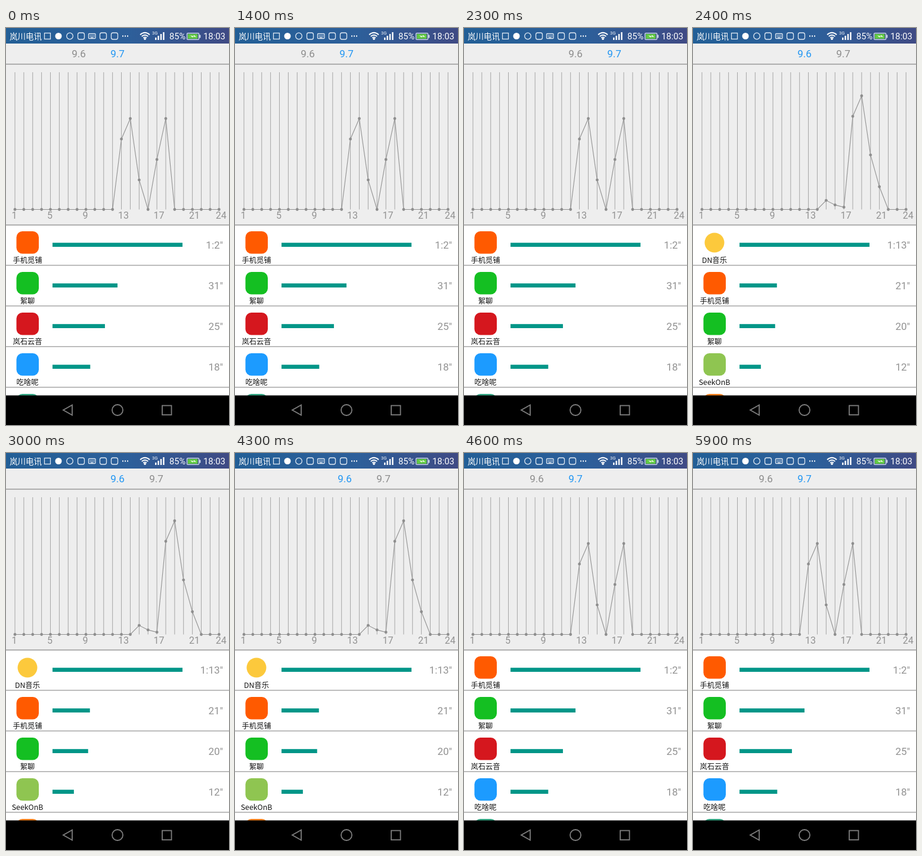
Animation of 374x664 px, one loop 6.4 s. Source, as an HTML page:

```html
<!DOCTYPE html>
<html lang="zh-CN">
<head>
<meta charset="utf-8">
<title>App usage</title>
<style>
  html, body { margin: 0; width: 100%; height: 100%; overflow: hidden; background: #fff; }
  svg { display: block; width: 374px; height: 664px; font-family: Roboto, "Noto Sans CJK SC", sans-serif; }
  .label { font: 12.3px "Noto Sans CJK SC", "Noto Sans CJK", sans-serif; fill: #111; text-anchor: middle; }
  .duration { font-size: 17px; fill: #929292; text-anchor: end; }
  .hour { font-size: 16px; fill: #929292; }
  .tab { font-size: 17px; text-anchor: middle; }
  .rule { stroke: #969696; stroke-width: 1.3; }
</style>
</head>
<body>
<svg viewBox="0 0 374 664">
  <defs>
    <linearGradient id="sky">
      <stop offset="0" stop-color="#235f96"/>
      <stop offset=".55" stop-color="#2d5f9a"/>
      <stop offset="1" stop-color="#3f4a84"/>
    </linearGradient>
  </defs>
  <rect y="26" width="374" height="303" fill="#eee"/>
  <path class="rule" d="M0 60.5H374M0 329.5H374"/>
  <g id="tabs">
    <text class="tab" x="122" y="49.3">9.6</text>
    <text class="tab" x="187" y="49.3">9.7</text>
  </g>
  <g id="grid"></g>
  <g id="pages"></g>

  <rect width="374" height="26" fill="url(#sky)"/>
  <g fill="#fff">
    <text x="6" y="18.7" style="font:500 13.5px 'Noto Sans CJK SC','Noto Sans CJK',sans-serif">岚川电讯</text>
    <text x="274" y="19" font-size="14.6">85%</text>
    <text x="331" y="19.2" font-size="14.8">18:03</text>
    <text x="245" y="10.8" font-size="7.5">3G</text>
    <path d="M250 16h2.4v4H250zM254.4 13h2.4v7h-2.4zM258.8 10h2.4v10h-2.4zM263.2 7h2.4v13h-2.4z"/>
    <circle cx="88" cy="13.5" r="5.5"/>
    <circle cx="233" cy="18.3" r="1.8"/>
    <path d="M195 12.5h2v2h-2zM199 12.5h2v2h-2zM203 12.5h2v2h-2z"/>
  </g>
  <g fill="none" stroke="#dde7f2" stroke-width="1.3">
    <rect x="64.5" y="8.5" width="10" height="10"/>
    <circle cx="107" cy="13.5" r="5.3"/>
    <rect x="120.5" y="8" width="11" height="11" rx="3"/>
    <rect x="138.5" y="9.5" width="11.5" height="8" rx="1"/>
    <path d="M140.5 12.3h8M140.5 14.3h8" stroke-dasharray="1.2 1"/>
    <path d="M142 16.1h4.5"/>
    <rect x="157.5" y="8" width="11" height="11" rx="3"/>
    <rect x="176.5" y="8" width="11" height="11" rx="3"/>
    <path d="M225 11.2q8-7 16 0M227.7 14q5.3-4.6 10.6 0M230.2 16.6q2.8-2.4 5.6 0" stroke="#fff" stroke-width="1.8"/>
    <rect x="303.6" y="8.6" width="20" height="10.8" rx="1.5"/>
  </g>
  <rect x="305" y="10" width="16.5" height="8" fill="#62c944"/>
  <path d="M324.5 11.5h1.8v5h-1.8z" fill="#dde7f2"/>
  <path d="M309 12.5l5.5 1.2.8-1.7 4 3-5.5-.8-.8 1.6z" fill="#fff"/>

  <rect y="614.5" width="374" height="49.5"/>
  <g fill="none" stroke="#7d7d7d" stroke-width="1.8">
    <path d="M111 630.5V647.5L96 639Z"/>
    <circle cx="187" cy="639" r="9"/>
    <rect x="262" y="631.5" width="15.5" height="15.5"/>
  </g>
</svg>
<script>
const LOOP = 6400;
const days = [
  {
    minutes: { 15: 4, 16: 2, 17: 1, 18: 41, 19: 50, 20: 24, 21: 10 },
    apps: [
      ['DN音乐', 73, '#fcc93c', true], ['手机觅铺', 21, '#ff5a00'], ['絮聊', 20, '#14bf22'],
      ['SeekOnB', 12, '#8fc551'], ['', 0, '#f5821f']
    ]
  },
  {
    minutes: { 13: 31, 14: 40, 15: 13, 17: 22, 18: 40 },
    apps: [
      ['手机觅铺', 62, '#ff5a00'], ['絮聊', 31, '#14bf22'], ['岚石云音', 25, '#d5171e'],
      ['吃啥呢', 18, '#1c9bff'], ['', 0, '#35a885']
    ]
  }
];

const byId = id => document.getElementById(id);
const hours = Array.from({ length: 24 }, (_, i) => i + 1);
const hourX = hour => 15 + (hour - 1) * 14.88;
const minuteY = minutes => 303.5 - minutes * 3.8;
const formatTime = m => (m < 60 ? m : `${Math.floor(m / 60)}:${m % 60}`) + '″';

function chart(minutes) {
  const points = hours.map(h => [hourX(h), minuteY(minutes[h] || 0)]);
  return `<polyline points="${points.join(' ')}" fill="none" stroke="#929292" stroke-width="1.1"/>` +
    points.map(([x, y]) => `<circle cx="${x}" cy="${y}" r="2.4" fill="#8e8e8e"/>`).join('');
}

function appRow([name, minutes, color, round], index, apps) {
  const icon = round
    ? `<circle cx="36" cy="29.5" r="16.5" fill="${color}"/>`
    : `<rect x="17.5" y="10.5" width="37.5" height="37.5" rx="10" fill="${color}"/>`;
  const details = minutes ? `
    <text class="label" x="36" y="63">${name}</text>
    <rect x="78" y="29.7" width="${218 * minutes / apps[0][1]}" height="6.8" fill="#009688"/>
    <text class="duration" x="364" y="39.8">${formatTime(minutes)}</text>
    <path class="rule" d="M0 67.4H374"/>` : '';
  return `<g transform="translate(0 ${329.5 + index * 68})">${icon}${details}</g>`;
}

byId('grid').innerHTML =
  hours.map(h => `<path d="M${hourX(h)} 74V303.5" stroke="#a5a5a5"/>`).join('') +
  [1, 5, 9, 13, 17, 21, 24].map(h => `<text class="hour" x="${hourX(h) - 5.5}" y="318.8">${h}</text>`).join('');
byId('pages').innerHTML =
  days.map(day => `<g>${chart(day.minutes)}${day.apps.map(appRow).join('')}</g>`).join('');

const tabs = byId('tabs');
const pages = byId('pages').children;

function ease(time, start, end) {
  const p = Math.min(1, Math.max(0, (time - start) / (end - start)));
  return p * p * (3 - 2 * p);
}

function draw(now) {
  // The screen refreshes ten times a second; the page switches once the tabs have settled.
  const time = Math.floor(now % LOOP / 100) * 100;
  const shift = 65 * (ease(time, 1900, 2300) - ease(time, 4270, 4500));
  const selected = time >= 2400 && time < 4600 ? 0 : 1;
  tabs.setAttribute('transform', `translate(${shift} 0)`);
  days.forEach((_, i) => {
    tabs.children[i].setAttribute('fill', i === selected ? '#2196f3' : '#8c8c8c');
    pages[i].setAttribute('display', i === selected ? 'inline' : 'none');
  });
}

const began = performance.now();
function tick() {
  draw(performance.now() - began);
  requestAnimationFrame(tick);
}
tick();
</script>
</body>
</html>
```
